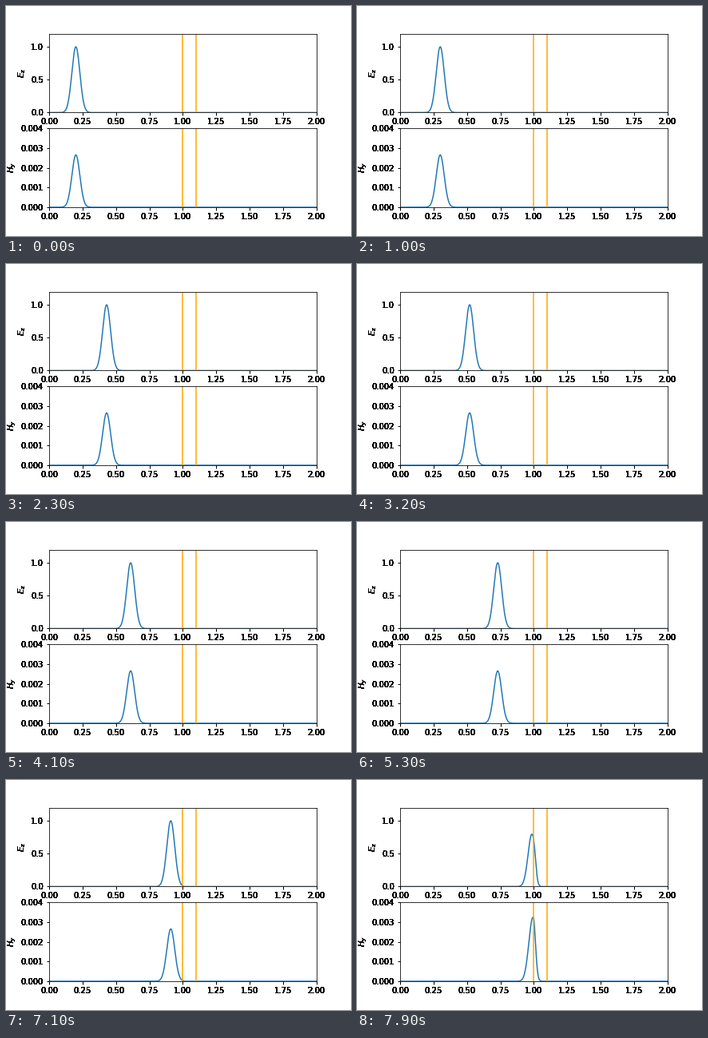
A matplotlib script that plays this animation: 432x288 px, repeating every 8000 ms.

```python
import numpy as np
import matplotlib.pyplot as plt
from matplotlib.animation import FuncAnimation
from matplotlib.text import Text

FRAMES, INTERVAL = 80, 100
START, STEP, SIGMA = 0.2, 0.01, 0.03     # pulse centre, advance per frame, width
SLAB = (1.0, 1.1)
INDEX = np.sqrt(3)                       # refractive index of the slab
IMPEDANCE = 377.0
REFLECT = (1 - INDEX) / (1 + INDEX)

plt.rcParams.update({
    "font.family": "DejaVu Sans",
    "font.size": 10,
    "mathtext.fontset": "dejavusans",
    "xtick.major.width": 1.0,
    "ytick.major.width": 1.0,
})

# Overprinting hardens the antialiased edges of the lettering.
draw_once = Text.draw


def draw_hard(self, renderer):
    for _ in range(14):
        draw_once(self, renderer)


Text.draw = draw_hard


def gauss(u):
    return np.exp(-u**2 / (2 * SIGMA**2))


def fields(centre):
    """Pulse meeting the slab face: incident, reflected and transmitted parts."""
    face = SLAB[0]
    incident = gauss(x - centre)
    echo = REFLECT * gauss(2 * face - x - centre)
    inside = gauss(INDEX * (x - face) + face - centre)
    e = np.where(x < face, incident + echo, (1 + REFLECT) * inside)
    h = np.where(x < face, incident - echo, (1 - REFLECT) * inside)
    return e, h / IMPEDANCE


x = np.linspace(0, 2, 1001)
fig, axes = plt.subplots(2, 1, figsize=(6, 4), dpi=72)
fig.subplots_adjust(left=0.125, right=0.9, bottom=0.125, top=0.88, hspace=0.2)

curves = []
for ax, label, top in zip(axes, ("$E_z$", "$H_y$"), (1.2, 0.004)):
    curves += ax.plot(x, 0 * x, color="C0", lw=1.5)
    for edge in SLAB:
        ax.axvline(edge, color="orange", lw=1.5)
    ax.set(xlim=(0, 2), ylim=(0, top), ylabel=label)


def update(i):
    for curve, values in zip(curves, fields(START + STEP * i)):
        curve.set_ydata(values)
    return curves


anim = FuncAnimation(fig, update, frames=FRAMES, interval=INTERVAL,
                     repeat=True, repeat_delay=0)
plt.show()
```
